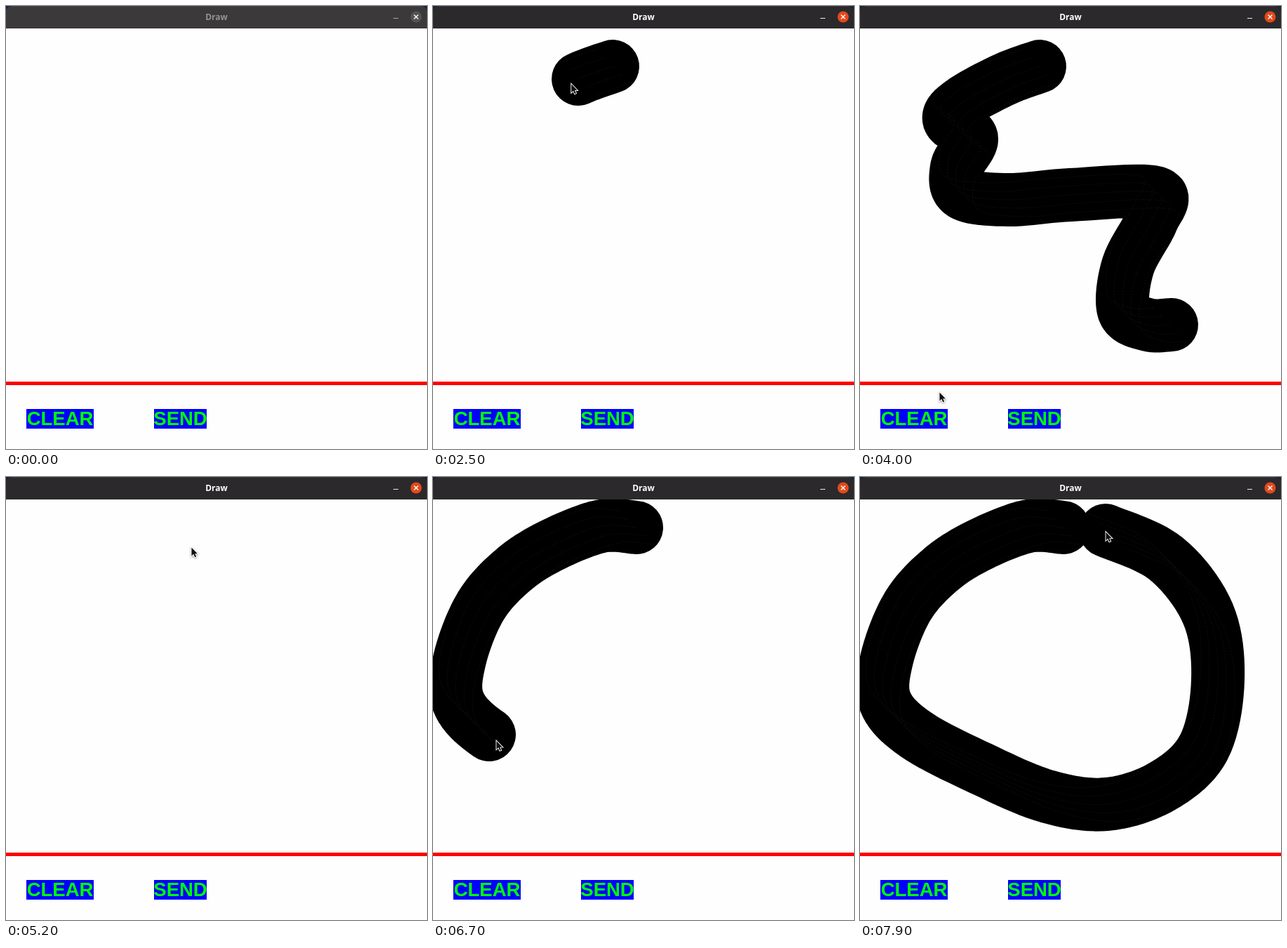
An HTML page with a canvas that plays this animation: 600 px wide and 631 px high, repeating every 8 s.

```html
<!DOCTYPE html>
<html lang="en">
<head>
<meta charset="utf-8">
<title>Draw</title>
<style>
  html, body { margin: 0; height: 100%; overflow: hidden; background: #fffeff; }
  canvas { display: block; }
</style>
</head>
<body>
<canvas width="600" height="631"></canvas>
<script>
const ctx = document.querySelector('canvas').getContext('2d');
const LOOP = 8000, STEP = 100, BRUSH = 76, LEAD = 15;
const FOCUS_AT = 1500, CLEAR_AT = 4300;

// A stroke is a smooth curve through a few turning points; keys: [time, point index]
const zigzag = {
  keys: [[2400, 0], [2500, 1], [3200, 9], [3700, 14]],
  points: [
    [256, 86], [207, 104], [146, 137], [127, 162], [159, 188], [138, 230], [146, 267], [212, 276],
    [300, 269], [422, 266], [416, 305], [382, 370], [376, 434], [410, 454], [444, 454]]
};
const ring = {
  keys: [[5800, 0], [6700, 7], [7500, 14.2], [7900, 16]],
  points: [
    [290, 72], [240, 70], [172, 96], [116, 131], [68, 184], [38, 260], [36, 320], [80, 367],
    [172, 415], [267, 455], [352, 466], [432, 440], [490, 385], [510, 290], [496, 195],
    [436, 116], [350, 76]]
};
// Pointer moves between strokes: [time, x, y]
const pointer = [
  [100, 594, 20], [900, 125, 190], [1100, 169, 118], [1200, 169, 118], [2100, 256, 88],
  [3700, 444, 456], [4000, 113, 550], [4100, 82, 592], [4700, 82, 592], [5200, 264, 100],
  [5600, 290, 74]];

function track(keys, t, column) {
  const next = keys.findIndex(k => k[0] > t);
  if (next === 0) return keys[0][column];
  if (next < 0) return keys[keys.length - 1][column];
  const a = keys[next - 1], b = keys[next];
  return a[column] + (b[column] - a[column]) * (t - a[0]) / (b[0] - a[0]);
}

// Catmull-Rom position at parameter u
function along(points, u) {
  const i = Math.min(Math.floor(u), points.length - 2), f = u - i;
  const p = n => points[Math.max(0, Math.min(points.length - 1, n))];
  return [0, 1].map(k => {
    const a = p(i - 1)[k], b = p(i)[k], c = p(i + 1)[k], d = p(i + 2)[k];
    return b + f / 2 * (c - a + f * (2 * a - 5 * b + 4 * c - d + f * (3 * (b - c) + d - a)));
  });
}

function drawStroke({ keys, points }, t) {
  const end = track(keys, t, 1), path = new Path2D();
  path.moveTo(...points[0]);
  for (let u = 0; u < end; u += 0.1) path.lineTo(...along(points, u));
  path.lineTo(...along(points, end));
  ctx.save();
  ctx.lineCap = ctx.lineJoin = 'round';
  ctx.lineWidth = BRUSH;
  ctx.strokeStyle = '#000';
  ctx.stroke(path);
  // Faint gaps left by the brush
  ctx.lineWidth = 1;
  ctx.lineCap = 'butt';
  ctx.strokeStyle = '#1c1c1c';
  ctx.setLineDash([1, 3]);
  for (let shift = -24; shift <= 24; shift += 12) {
    ctx.save();
    ctx.translate(shift, shift);
    ctx.stroke(path);
    ctx.restore();
  }
  ctx.restore();
}

function text(value, x, y, font, color) {
  ctx.font = font;
  ctx.fillStyle = color;
  ctx.textAlign = 'center';
  ctx.fillText(value, x, y);
}

function box(x, y, w, h, color) {
  ctx.fillStyle = color;
  ctx.fillRect(x, y, w, h);
}

function line(color, width, ...segments) {
  ctx.strokeStyle = color;
  ctx.lineWidth = width;
  ctx.beginPath();
  for (const [x1, y1, x2, y2] of segments) {
    ctx.moveTo(x1, y1);
    ctx.lineTo(x2, y2);
  }
  ctx.stroke();
}

function button(label, x, w) {
  box(x, 574, w, 28, '#00f');
  text(label, x + w / 2, 597, 'bold 27.5px "Liberation Sans", Arial, sans-serif', '#0f0');
}

function titleBar(focused) {
  box(0, 0, 600, 32, '#14223c');
  ctx.beginPath();
  ctx.roundRect(0, 0, 600, 32, [8, 8, 0, 0]);
  ctx.fillStyle = focused ? '#2b292c' : '#3c393b';
  ctx.fill();
  line(focused ? '#3a383b' : '#484547', 1, [8, 0.5, 592, 0.5]);
  text('Draw', 300, 20, 'bold 12px "Noto Sans", "Open Sans", sans-serif', focused ? '#fff' : '#959394');
  line(focused ? '#eee' : '#aaa', 1, [552, 17.5, 559, 17.5]);
  ctx.beginPath();
  ctx.arc(584.5, 15.5, 8, 0, 7);
  ctx.fillStyle = focused ? '#e2491b' : '#545253';
  ctx.fill();
  line('#fff', 1.4, [581.5, 12.5, 587.5, 18.5], [587.5, 12.5, 581.5, 18.5]);
}

function drawPointer(x, y) {
  const arrow = new Path2D('M.5 .5V13.5L3.5 10.7L5.7 15.6L7.8 14.7L5.7 10H9.7Z');
  ctx.save();
  ctx.translate(x, y);
  ctx.scale(0.92, 0.92);
  ctx.shadowColor = 'rgba(0,0,0,.4)';
  ctx.shadowBlur = 3;
  ctx.shadowOffsetY = 1;
  ctx.strokeStyle = '#fff';
  ctx.lineWidth = 2;
  ctx.stroke(arrow);
  ctx.shadowColor = 'transparent';
  ctx.fillStyle = '#111';
  ctx.fill(arrow);
  ctx.restore();
}

// While drawing, the pointer runs slightly ahead of the ink
function pointerAt(t) {
  for (const { keys, points } of [zigzag, ring]) {
    if (t < keys[0][0] || t > keys[keys.length - 1][0]) continue;
    const [x, y] = along(points, track(keys, t + LEAD, 1));
    return [x, y + 2];
  }
  return [track(pointer, t, 1), track(pointer, t, 2)];
}

function render(t) {
  box(0, 0, 600, 631, '#fffeff');
  if (t >= zigzag.keys[0][0] && t < CLEAR_AT) drawStroke(zigzag, t);
  if (t >= ring.keys[0][0]) drawStroke(ring, t);
  box(0, 535, 600, 5, '#f00');
  button('CLEAR', 29, 96);
  button('SEND', 211, 75);
  titleBar(t >= FOCUS_AT);
  if (t >= pointer[0][0]) drawPointer(...pointerAt(t));
}

const start = performance.now();
function tick() {
  const t = (performance.now() - start) % LOOP;
  render(Math.floor(t / STEP) * STEP);
  requestAnimationFrame(tick);
}
tick();
</script>
</body>
</html>
```
